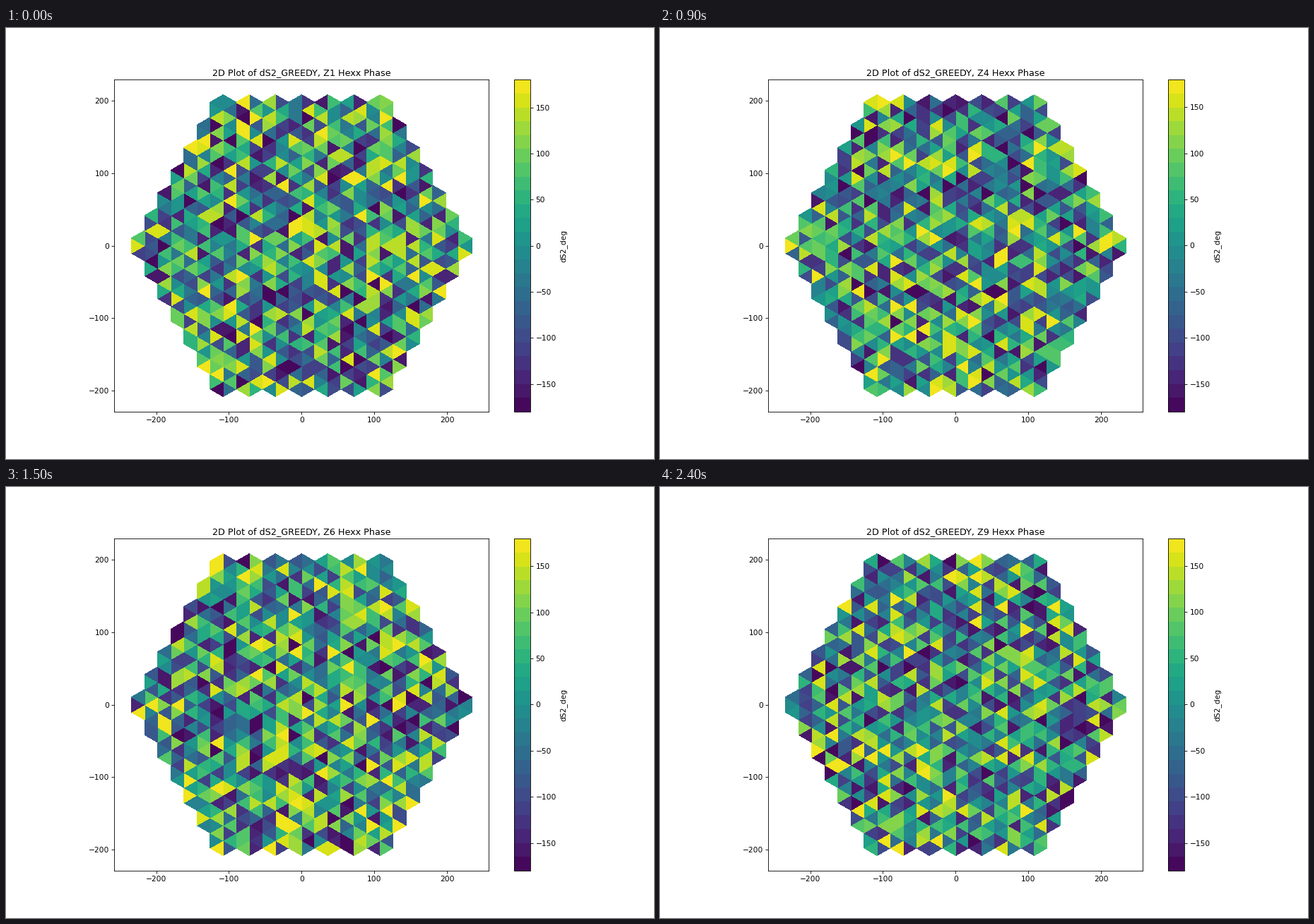
A matplotlib script that plays this animation: 917x611 px, repeating every 2.7 s.

```python
import numpy as np
import matplotlib.pyplot as plt
from matplotlib.animation import FuncAnimation
from matplotlib.collections import PolyCollection
from matplotlib.colors import ListedColormap

WIDTH, HEIGHT = 917, 611
DPI = WIDTH / 12
COLUMN = 18.0                      # width of one column of triangles
SIDE = 2 * COLUMN / np.sqrt(3)     # length of a triangle's side
BANDS = 24
PLANES = 9
TOPS = [180, 179.6, 179.2, 179.7, 179.8, 179.9, 179.9, 179.7, 179.6]


def column_triangles(c):
    """Triangles between the vertical lattice lines c and c + 1."""
    edges = min(20, 2 + 3 * (12 - c))
    wide, narrow = (c, c + 1) if (edges - c) % 2 == 0 else (c + 1, c)
    for i in range(edges):
        y = i - edges / 2
        yield [(wide, y), (wide, y + 1), (narrow, y + 0.5)]
        if i < edges - 1:
            yield [(narrow, y + 0.5), (narrow, y + 1.5), (wide, y + 1)]


def hex_grid():
    half = np.array([t for c in range(13) for t in column_triangles(c)])
    half = half * (COLUMN, SIDE)
    return np.concatenate([half, half * (-1, 1)])


triangles = hex_grid()
phases = np.random.default_rng(12).uniform(-180, 180, (PLANES, len(triangles)))

# Each band takes the colour at its middle.
viridis = plt.get_cmap("viridis")
banded = ListedColormap(viridis((np.arange(BANDS) + 0.5) / BANDS))

fig, ax = plt.subplots(figsize=(WIDTH / DPI, HEIGHT / DPI), dpi=DPI)
cells = PolyCollection(triangles, cmap=banded, edgecolors="none",
                       linewidths=0, antialiased=False)
cells.set_array(phases[0])
cells.set_clim(-180, TOPS[0])
ax.add_collection(cells)
ax.set_aspect("equal")
ax.set_xlim(-257.4, 257.4)
ax.set_ylim(-11 * SIDE, 11 * SIDE)
fig.colorbar(cells, ax=ax, label="dS2_deg")
title = ax.set_title("")


def show_plane(n):
    cells.set_array(phases[n])
    cells.set_clim(-180, TOPS[n])
    title.set_text(f"2D Plot of dS2_GREEDY, Z{n + 1} Hexx Phase")
    return cells, title


anim = FuncAnimation(fig, show_plane, frames=PLANES, interval=300, repeat=True)
plt.show()
```
